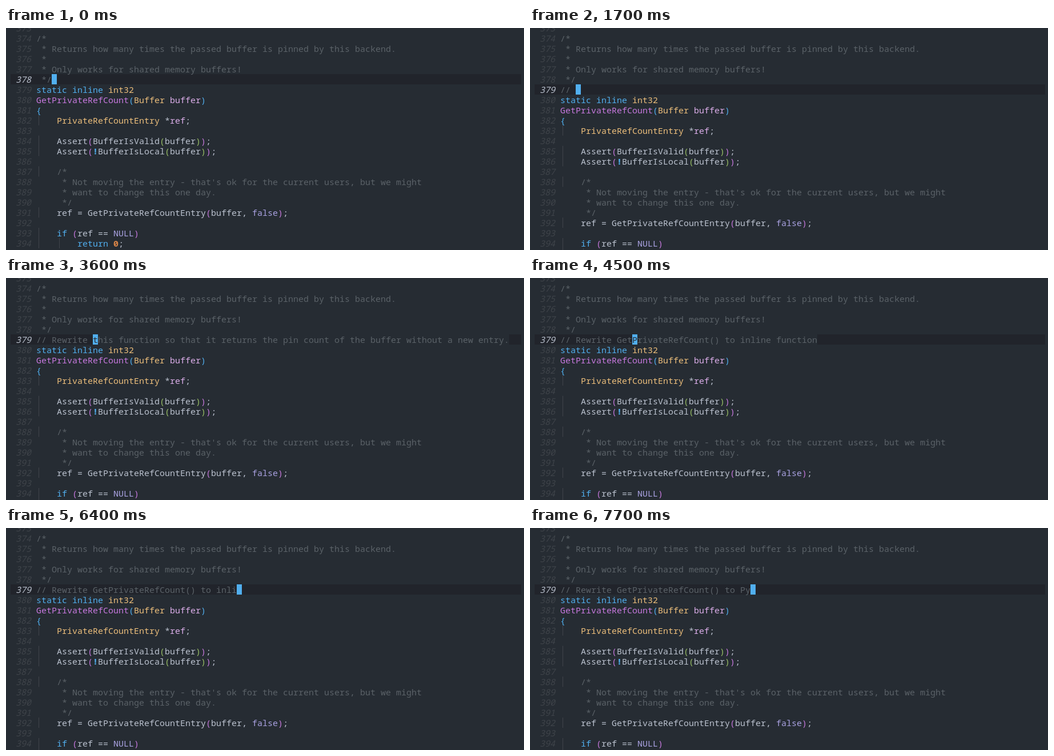
Animation of 907 by 390 pixels, one loop 8 s. Source, as an HTML page:

```html
<!DOCTYPE html>
<html lang="en">
<head>
<meta charset="utf-8">
<title>Editor typing</title>
<style>
  html, body { margin: 0; width: 100%; height: 100%; overflow: hidden; background: #262c33; }
  #stage {
    position: relative; width: 907px; height: 390px; overflow: hidden;
    background: #262c33; color: #bbc2cf;
    font: 15px/18px "Noto Sans Mono", monospace;
    font-variant-ligatures: none;
  }
  #stage > * { position: absolute; height: 18px; white-space: pre; }
  #stage span { display: inline-block; height: 18px; vertical-align: top; }
  .number { left: 17px; color: #3f444a; font-style: italic; }
  .number.current { color: #bbc2cf; }
  .code { left: 53px; }
  .guide { width: 1px; background: #3f444a; }
  #band { left: 8px; width: 894px; background: #21242b; }
  .c { color: #5b6268; }
  .b { color: #51afef; }
  .y { color: #ecbe7b; }
  .m { color: #c678dd; }
  .p { color: #dcaeea; }
  .g { color: #98be65; }
  .v { color: #a9a1e1; }
  .o { color: #da8548; font-weight: bold; }
  .n { color: #51afef; font-weight: bold; }
  .ghost { color: #5b6268; background: #262c33; }
  .cursor { width: 9px; background: #51afef; color: #262c33; }
</style>
</head>
<body>
<div id="stage"></div>
<script>
const LOOP = 8000, CELL = 9, ROW = 18, LEFT = 53, FIRST = 373;
const stage = document.getElementById('stage');

// `xtext` marks text with colour class x
const headLines = [
  '', '`c/*`',
  '`c * Returns how many times the passed buffer is pinned by this backend.`',
  '`c *`',
  '`c * Only works for shared memory buffers!`',
  '`c */`'
];
const bodyLines = [
  '`bstatic inline` `yint32`',
  '`mGetPrivateRefCount``b(``yBuffer` `pbuffer``b)`',
  '`b{`',
  '    `yPrivateRefCountEntry` *`pref`;',
  '',
  '    Assert`m(`BufferIsValid`g(`buffer`g)``m)`;',
  '    Assert`m(``n!`BufferIsLocal`g(`buffer`g)``m)`;',
  '',
  '    `c/*`',
  "     `c* Not moving the entry - that's ok for the current users, but we might`",
  '     `c* want to change this one day.`',
  '     `c*/`',
  '    ref = GetPrivateRefCountEntry`m(`buffer, `vfalse``m)`;',
  '',
  '    `bif` `m(`ref == `vNULL``m)`',
  '        `breturn` `o0`;',
  ''
];
const commentEnd = headLines.length - 1;

const base = '// Rewrite GetPrivateRefCount() to ';
const accepted = base + 'inline function';
const retyped = base + 'Py';
const firstIdea = '// Rewrite this function so that it returns the pin count of the buffer without a new entry.';

// time, cursor column, typed line, suggested line
const steps = [
  [600, 0], [1100, 1], [1300, 2], [1700, 3], [2100, 4], [2400, 5], [2800, 6],
  [3100, 7], [3300, 8], [3400, 9], [3500, 10], [3600, 11, accepted, firstIdea],
  [4000, 12], [4200, 13], [4500, 14, accepted, accepted], [5300, 50],
  [5600, 49, accepted, accepted],
  [6100, 48], [6200, 45], [6300, 42], [6400, 39], [6500, 38],
  [6600, 38, accepted, accepted], [6800, 37, accepted, accepted],
  [7000, 36, accepted, accepted], [7100, 35, accepted, accepted],
  [7400, 36, retyped], [7700, 37, retyped]
];

const span = (cls, text) => `<span class="${cls}">${text}</span>`;
const paint = line => line.replace(/`(\w)([^`]*)`/g, (_, cls, text) => span(cls, text));

function place(el, row) {
  el.style.top = row * ROW - 9 + 'px';
}

function add(cls, row, html = '') {
  const el = document.createElement('div');
  el.className = cls;
  el.innerHTML = html;
  place(el, row);
  stage.append(el);
  return el;
}

const band = add('', commentEnd);
band.id = 'band';
const numbers = Array.from({ length: 23 }, (_, row) => add('number', row, FIRST + row));
headLines.forEach((line, row) => add('code', row, paint(line)));

const movable = [];
bodyLines.forEach((line, i) => {
  const row = headLines.length + i;
  movable.push([add('code', row, paint(line)), row]);
  const indent = line.match(/^ */)[0].length;
  if (indent % 4) return;
  for (let col = 0; col < indent; col += 4) {
    const guide = add('guide', row);
    guide.style.left = LEFT + col * CELL + 4 + 'px';
    movable.push([guide, row]);
  }
});
const input = add('code', commentEnd);

function renderInput(step) {
  if (!step) return '   ' + span('cursor', '');
  const [, col, text = accepted, idea = ''] = step;
  const rest = idea.slice(col);
  return span(col === 1 ? '' : 'c', text.slice(0, col)) +
    span('cursor', rest.slice(0, 1)) + span('ghost', rest.slice(1));
}

let shown;
function show(index) {
  if (index === shown) return;
  shown = index;
  const inserted = index < 0 ? 0 : 1;
  const current = commentEnd + inserted;
  movable.forEach(([el, row]) => place(el, row + inserted));
  numbers.forEach((el, row) => el.classList.toggle('current', row === current));
  place(band, current);
  place(input, current);
  input.innerHTML = renderInput(steps[index]);
}

const start = performance.now();
function tick() {
  const time = (performance.now() - start) % LOOP;
  show(steps.filter(step => step[0] <= time).length - 1);
  requestAnimationFrame(tick);
}
tick();
</script>
</body>
</html>
```
